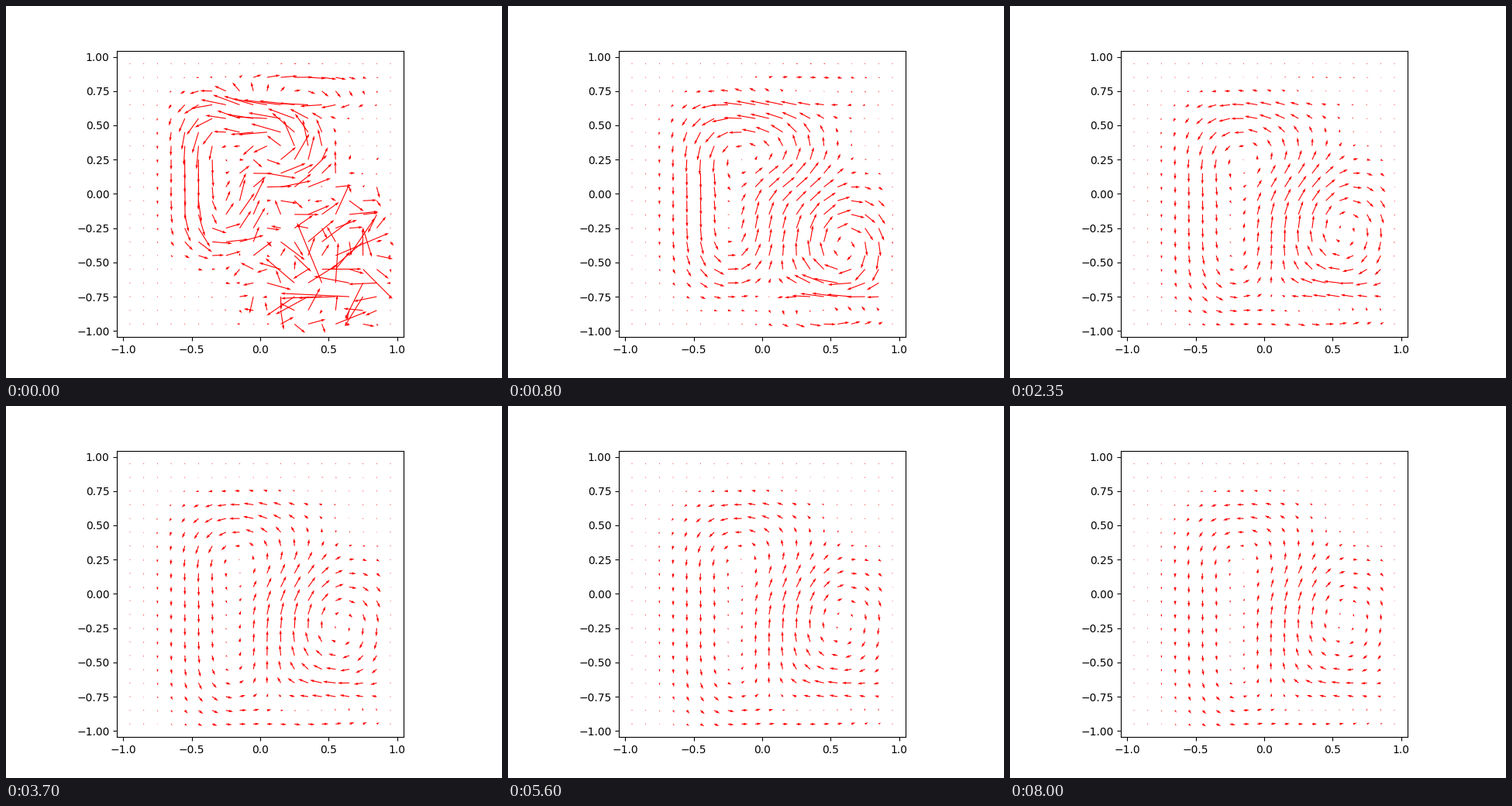
A matplotlib script that plays this animation: 640x480 px, repeating every 8.05 s.

```python
import numpy as np
import matplotlib.pyplot as plt
from matplotlib.animation import FuncAnimation

FRAMES, STEP = 161, 50

# Vortices: final centre, early offset, radii, flatness, spin (+ is
# counterclockwise) and how quickly the spin fades
VORTICES = [
    ((-0.20, -0.20), (-0.10, 0.35), (0.38, 0.80), 4, 7.0, 0.30),
    ((0.57, -0.12), (0.05, -0.50), (0.38, 0.45), 2, -8.0, 0.40),
    ((0.45, -0.83), (0.10, 0.00), (0.45, 0.20), 2, 4.5, 0.50),
    ((0.20, 0.73), (0.05, 0.00), (0.60, 0.17), 2, -2.2, 0.90),
    ((0.12, 0.30), (0.00, 0.00), (0.40, 0.38), 2, 6.5, 0.80),
]

axis = np.linspace(-0.95, 0.95, 20)
X, Y = np.meshgrid(axis, axis)

# Turbulence in the lower right that dies out quickly
rng = np.random.default_rng(4)
patch = np.exp(-((X - 0.45) / 0.5) ** 2 - ((Y + 0.45) / 0.45) ** 2)
gusts = rng.normal(0, 36, (2, 20, 20)) * patch
wall = np.where(X > 0.9, 0.2, 1)


def velocity(t):
    """Velocity in pixels: spreading, fading vortices plus turbulence."""
    youth = 1 / (1 + t)
    spread = 1 - 0.35 * youth
    u, v = gusts * np.exp(-t / 0.2)
    for (x, y), (dx, dy), (a, b), n, spin, fade in VORTICES:
        a, b = a * spread, b * spread
        p = (X - x - dx * youth) / a
        q = (Y - y - dy * youth) / b
        psi = spin * (t + 0.5) ** -fade * np.exp(-p ** 2 - q ** n)
        u = u - n * q ** (n - 1) / b * psi
        v = v + 2 * p / a * psi
    return u * wall, v * wall


fig, ax = plt.subplots(figsize=(6.4, 4.8), dpi=100)
ax.set_aspect("equal")
ax.set(xlim=(-1.045, 1.045), ylim=(-1.045, 1.045),
       xticks=np.linspace(-1, 1, 5), yticks=np.linspace(-1, 1, 9))
arrows = ax.quiver(X, Y, *velocity(0), color="red",
                   scale_units="dots", scale=1, width=0.003)


def update(i):
    arrows.set_UVC(*velocity(i * STEP / 1000))
    return arrows,


anim = FuncAnimation(fig, update, frames=FRAMES, interval=STEP,
                     repeat=True, repeat_delay=0)
plt.show()
```
